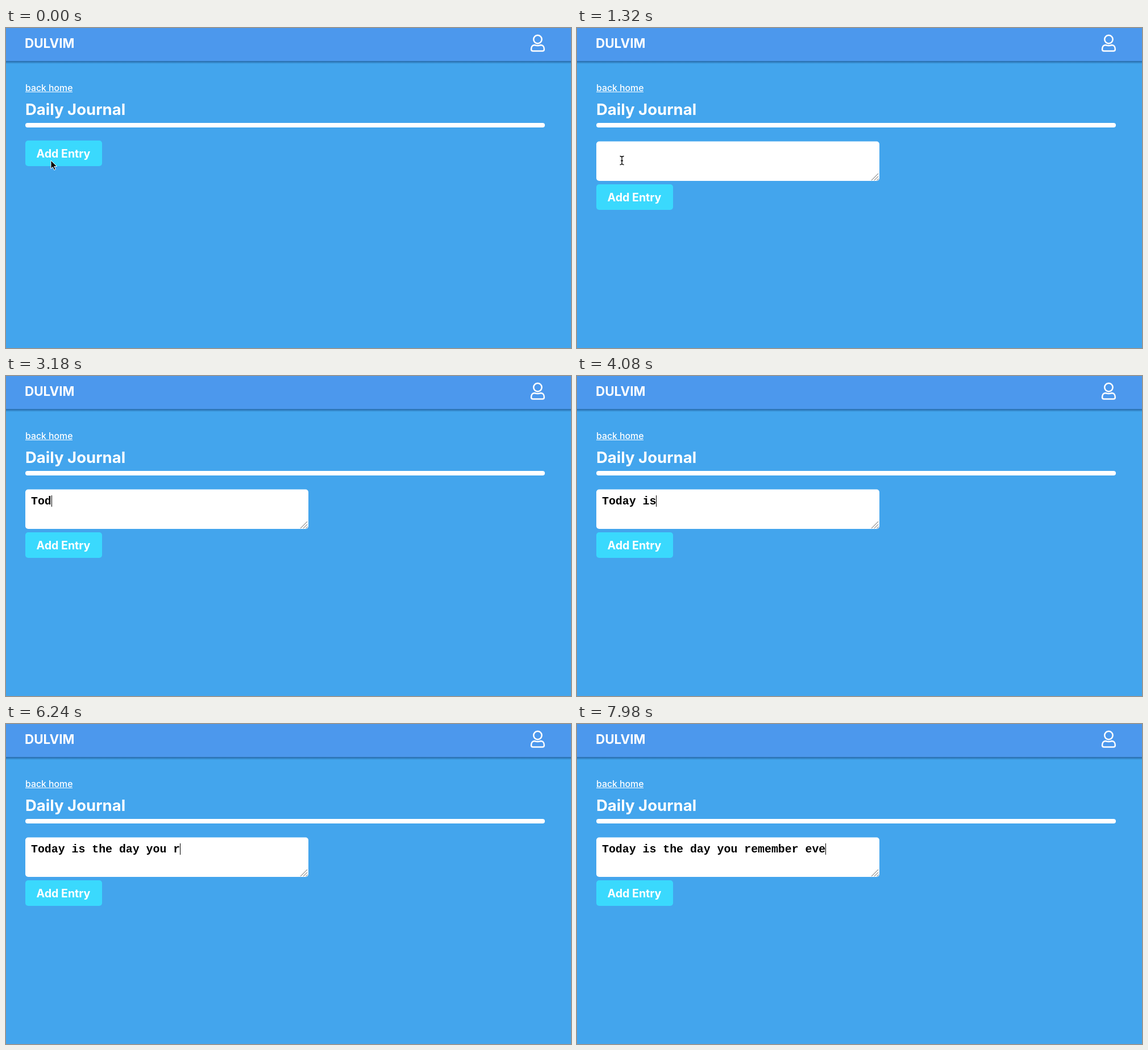
These frames come from a looping animation (994x563 px, 8 s). An HTML page:

```html
<!DOCTYPE html>
<html lang="en">
<meta charset="utf-8">
<title>Daily Journal</title>
<style>
  html, body { margin: 0; height: 100%; overflow: hidden; background: #43a5ed; }
  svg { display: block; }
  text { font-family: Inter, sans-serif; font-weight: 700; fill: #fff; white-space: pre; }
  #typed { font: 700 19.86px "Liberation Mono", monospace; fill: #000; }
</style>
<svg width="994" height="563" viewBox="0 0 994 563">
  <defs>
    <linearGradient id="shade" x2="0" y2="1">
      <stop stop-color="#2c6cad"/>
      <stop offset=".4" stop-color="#2f7dbd"/>
      <stop offset="1" stop-color="#43a5ed"/>
    </linearGradient>
  </defs>
  <rect width="994" height="563" fill="#43a5ed"/>
  <rect width="994" height="58" fill="#4c98ed"/>
  <rect y="58" width="994" height="5" fill="url(#shade)"/>
  <text x="33" y="35" font-size="22.4">DULVIM</text>
  <g fill="none" stroke="#fff" stroke-width="2.5">
    <circle cx="935.4" cy="20" r="7.2"/>
    <path d="M930 30q5.400 2 10.800 0c4.500 0 6 4 6 7.500q0 3-3 3h-16.800q-3 0-3-3c0-3.500 1.500-7.500 6-7.500z"/>
  </g>

  <text x="34" y="111" font-size="15.8" style="font-weight:500">back home</text>
  <path d="M34 112.500h83" stroke="#fff"/>
  <text x="34" y="153" font-size="27.5">Daily Journal</text>
  <rect x="34" y="167" width="914" height="8" rx="4" fill="#fff"/>

  <g id="button">
    <rect x="34" y="198" width="135" height="45" rx="5" fill="#3ad9fd"/>
    <text x="53.500" y="228" font-size="19.6">Add Entry</text>
  </g>

  <g id="field">
    <rect x="34" y="199.500" width="498" height="69.500" rx="5" fill="#fff"/>
    <path d="M518 268l12-12M523 268l7-7M527.500 268l3-3" stroke="#666"/>
    <text id="typed" x="44" y="225.500"></text>
    <path id="caret" d="M.5 210v20" stroke="#000"/>
  </g>

  <path id="arrow" d="M79 233v14.500l3.300-3 2.400 5.400 2.500-1.100-2.400-5.300h4.700z" fill="#000" stroke="#fff"/>
  <g id="beam" fill="none">
    <path id="beamShape" d="M75.500 225.500q3.500 0 3.500 2.500q0-2.500 3.500-2.500M79 227.500v11M75.500 240.500q3.500 0 3.500-2.500q0 2.500 3.500 2.500M77 233.500h4" stroke="#fff" stroke-width="3"/>
    <use href="#beamShape" style="stroke:#000"/>
    <path d="M75.500 225.500q3.500 0 3.500 2.500q0-2.500 3.500-2.500M79 227.500v11M75.500 240.500q3.500 0 3.500-2.500q0 2.500 3.500 2.500M77 233.500h4" stroke="#000" stroke-width="1.300"/>
  </g>
</svg>
<script>
  const LOOP = 8000, CHAR_WIDTH = 11.918;
  const MESSAGE = "Today is the day you remember eve";
  const OPEN_AT = 1320, FOCUS_AT = 2040;
  // Time of each keystroke, one row per word
  const KEYS = [
    2880, 3000, 3120, 3300, 3420, 3540,
    3900, 4020, 4140,
    4320, 4380, 4440, 4560,
    4740, 4800, 4920, 5220,
    5280, 5400, 5460, 5580,
    6060, 6360, 6600, 6720, 6840, 7020, 7140, 7260, 7380,
    7620, 7800, 7980
  ];
  const el = id => document.getElementById(id);
  const show = (id, on) => el(id).style.display = on ? "" : "none";
  el("beam").querySelector("use").remove();

  function draw(t) {
    const open = t >= OPEN_AT;
    const count = KEYS.filter(k => k <= t).length;
    const blinkOff = (t >= 2520 && t < KEYS[0]) || (t >= 5820 && t < 6060);

    show("field", open);
    el("button").setAttribute("transform", `translate(0 ${open ? 77 : 0})`);
    el("typed").textContent = MESSAGE.slice(0, count);
    el("caret").setAttribute("transform", `translate(${Math.round(44 + count * CHAR_WIDTH)} 0)`);
    show("caret", t >= FOCUS_AT && !blinkOff);
    show("arrow", t < 1260);
    show("beam", t >= 1260 && count === 0);
  }

  function tick() {
    draw(performance.now() % LOOP);
    requestAnimationFrame(tick);
  }
  tick();
</script>
</html>
```
